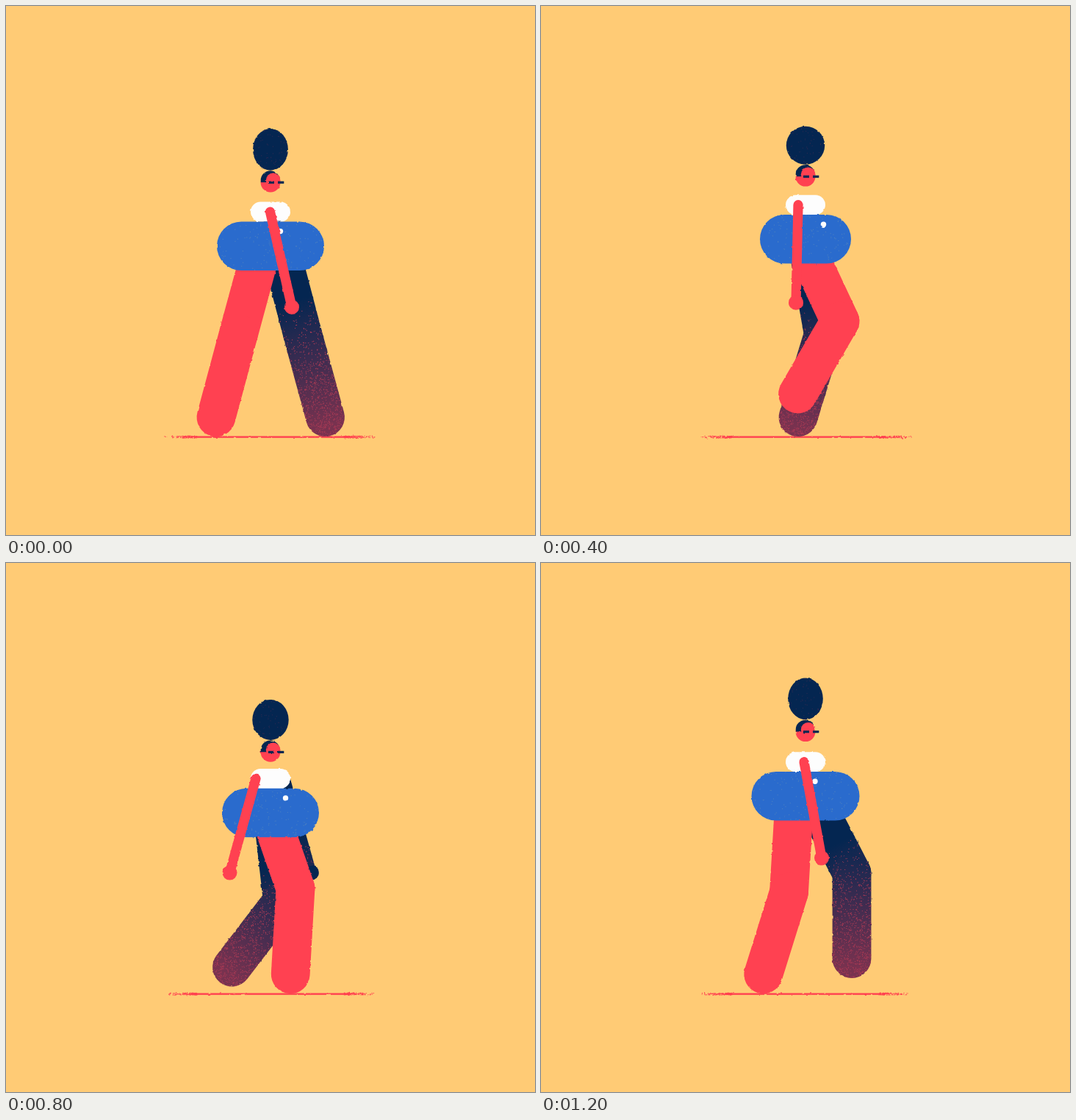
Write an HTML page with a canvas that moves like this. It is 720 by 720 pixels and loops after 1.28 s.

```html
<!DOCTYPE html>
<html lang="en">
<head>
<meta charset="utf-8">
<title>Walk cycle</title>
<style>
  html, body { margin: 0; width: 100%; height: 100%; overflow: hidden; background: #ffcb75; }
  canvas { display: block; filter: url(#rough); }
  svg { position: absolute; width: 0; height: 0; }
</style>
</head>
<body>
<canvas id="stage" width="720" height="720"></canvas>
<svg>
  <filter id="rough" x="0" y="0" width="100%" height="100%" color-interpolation-filters="sRGB">
    <feTurbulence id="noise" type="fractalNoise" baseFrequency=".2" numOctaves="1" result="n"/>
    <feDisplacementMap in="SourceGraphic" in2="n" scale="2.6" xChannelSelector="R" yChannelSelector="G"/>
  </filter>
</svg>
<script>
const ctx = document.getElementById('stage').getContext('2d');
const noise = document.getElementById('noise');
const RED = '#ff4151', NAVY = '#042651', PLUM = '#78324f', BLUE = '#2a6bcd', WHITE = '#fdfdfd';
const STEPS = 16, STEP_MS = 80, SHADE_START = 0.3;

// Smooth periodic curve through a few key poses
function track(times, vals, period = STEPS) {
  const n = times.length;
  const key = k => {
    const i = (k + n) % n;
    return [times[i] + period * Math.floor(k / n), vals[i]];
  };
  return p => {
    p = (p % period + period) % period;
    let i = n - 1;
    while (times[i] > p) i--;
    const [t0, v0] = key(i - 1), [t1, v1] = key(i), [t2, v2] = key(i + 1), [t3, v3] = key(i + 2);
    const d = t2 - t1, u = (p - t1) / d;
    const m1 = (v2 - v0) / (t2 - t0) * d, m2 = (v3 - v1) / (t3 - t1) * d;
    const a = u * u * (3 - 2 * u);
    return v1 + (v2 - v1) * a + m1 * u * (1 - u) ** 2 - m2 * u * u * (1 - u);
  };
}

const legT = [0, 2, 4, 5, 7, 8, 10, 12, 13, 15];
const leg = vals => track(legT, vals);
const hipX = leg([347.5, 350, 353, 357, 358, 360, 360, 353.5, 349, 345]);
const kneeX = leg([316.5, 363, 383.5, 407, 409.5, 390, 394, 382, 371, 337.5]);
const kneeY = leg([446, 460, 449, 429, 422, 446, 443, 447, 447, 448]);
const swingT = [0, 2, 4, 5, 7, 8];
const swingX = track(swingT, [286, 294, 301, 349.5, 409.5, 421]);
const swingY = track(swingT, [559.7, 550, 530, 528, 538.5, 559.7]);
const bodyT = [0, 2, 5, 7, 10, 12, 15];
const bodyW = track(bodyT, [146, 135, 124, 120, 132, 140, 147]);
const shoulderX = track(bodyT, [359.5, 360, 350, 342, 340, 345, 358]);
const handX = track(bodyT, [389, 390, 347, 312, 304.5, 326, 382]);
const bunR = track([0, 2, 4, 5, 7], [28.3, 27.5, 24, 26, 28.4], 8);

let seed = 1;
const rand = () => (seed = (seed * 16807) % 2147483647) / 2147483647;

function dot(x, y, size) { ctx.fillRect(x - size / 2, y - size / 2, size, size); }

function disc(x, y, rx, color, ry = rx) {
  ctx.fillStyle = color;
  ctx.beginPath();
  ctx.ellipse(x, y, rx, ry, 0, 0, 7);
  ctx.fill();
}

function pill(x, y, w, h, color) {
  ctx.fillStyle = color;
  ctx.beginPath();
  ctx.roundRect(x, y, w, h, Math.min(w, h) / 2);
  ctx.fill();
}

// Specks inside the current path; chance(v) gives their density down the box
function grain(x, y, w, h, count, color, chance = () => 1) {
  ctx.save();
  ctx.clip();
  ctx.fillStyle = color;
  for (let i = 0; i < count; i++) {
    const u = rand(), v = rand();
    if (rand() < chance(v)) dot(x + u * w, y + v * h, 1.1);
  }
  ctx.restore();
}

// Rounded limb piece; from/to place it on the shading ramp
function bone(a, b, r, color, from, to) {
  const len = Math.hypot(b[0] - a[0], b[1] - a[1]), h = len + 2 * r;
  const at = t => (t - from) / (to - from) * len;
  const shaded = color === NAVY;
  let paint = color;
  if (shaded) {
    paint = ctx.createLinearGradient(0, at(SHADE_START), 0, at(1.05));
    paint.addColorStop(0, NAVY);
    paint.addColorStop(1, PLUM);
  }
  ctx.save();
  ctx.translate(...a);
  ctx.rotate(Math.atan2(b[1] - a[1], b[0] - a[0]) - Math.PI / 2);
  pill(-r, -r, 2 * r, h, paint);
  if (shaded) {
    const ramp = v => {
      const t = from + (to - from) * (v * h - r) / len;
      return 0.3 * Math.max(0, (t - SHADE_START) / (1 - SHADE_START));
    };
    grain(-r, -r, 2 * r, h, r * h, '#a93a55', ramp);
  }
  ctx.restore();
}

function drawLeg(p, dx, hipY, color) {
  p %= STEPS;
  const planted = p >= 8;
  const foot = planted ? [421 - 16.9 * (p - 8), 559.7] : [swingX(p), swingY(p)];
  const knee = [kneeX(p) + dx, kneeY(p)];
  foot[0] += dx;
  bone([hipX(p) + dx, hipY], knee, 26.4, color, 0, 0.5);
  bone(knee, foot, 26.4, color, 0.5, 1);
}

function drawArm(p, shoulderDx, handDx, y, color) {
  const x = shoulderX(p) + shoulderDx, hx = handX(p) + handDx;
  const hy = y + Math.sqrt(133 ** 2 - (hx - x) ** 2);
  bone([x, y], [hx, hy], 6.6, color, 0, 0.5);
  disc(hx, hy, 10, color);
}

function drawHead(y, ry) {
  const bunY = y - 16.5 - ry, rx = 52.2 - ry;
  disc(360, bunY, rx, NAVY, ry);
  grain(360 - rx, bunY - ry, 2 * rx, 2 * ry, 60, '#2c2a52');
  disc(360, y, 13.4, RED);
  ctx.fillStyle = NAVY;
  ctx.beginPath();
  ctx.arc(359.7, y - 3, 13, Math.PI, 0);
  ctx.rect(346.8, y - 3.2, 8, 3);
  ctx.fill();
  disc(363.6, y - 3, 9.8, RED);
  ctx.fillStyle = NAVY;
  ctx.fillRect(357, y - 1.6, 8, 3.2);
  ctx.fillRect(370, y - 1.6, 8.3, 3.2);
}

// Brush line that crumbles towards both ends
function drawGround() {
  ctx.fillStyle = RED;
  ctx.fillRect(252, 585.4, 216, 2.4);
  for (let i = 0; i < 260; i++) {
    const side = rand() < 0.5 ? -1 : 1;
    const reach = 100 + 45 * (1 - Math.sqrt(rand()));
    dot(360 + side * reach, 586.6 + (rand() - 0.5) * 3, 1.1);
  }
}

function draw(step) {
  seed = 4001 + step * 977;
  ctx.clearRect(0, 0, 720, 720);
  const wave = lag => Math.sin((step * 45 - lag) * Math.PI / 180);
  const top = 293.4 + 13.3 * wave(0), shoulderY = top - 13.3;
  const w = bodyW(step), left = 360 - w / 2;

  drawGround();
  drawArm(step + 8, 20, 26, shoulderY, NAVY);
  drawLeg(step + 8, 13.5, top + 38.3, NAVY);
  drawLeg(step, 0, top + 38.3, RED);
  pill(333, top - 26.8, 54, 27, WHITE);
  pill(left, top, w, 66.6, BLUE);
  grain(left, top, w, 66.6, 130, '#4d80c0');
  disc(446.5 - w / 2, top + 13.2, 3.7, WHITE);
  drawHead(241.9 + 15.6 * wave(6.5), bunR(step));
  drawArm(step, 0, 0, shoulderY, RED);
  noise.setAttribute('seed', step + 1);
}

let shown = -1;
function tick() {
  const step = Math.floor(performance.now() / STEP_MS) % STEPS;
  if (step !== shown) draw(shown = step);
  requestAnimationFrame(tick);
}
tick();
</script>
</body>
</html>
```
